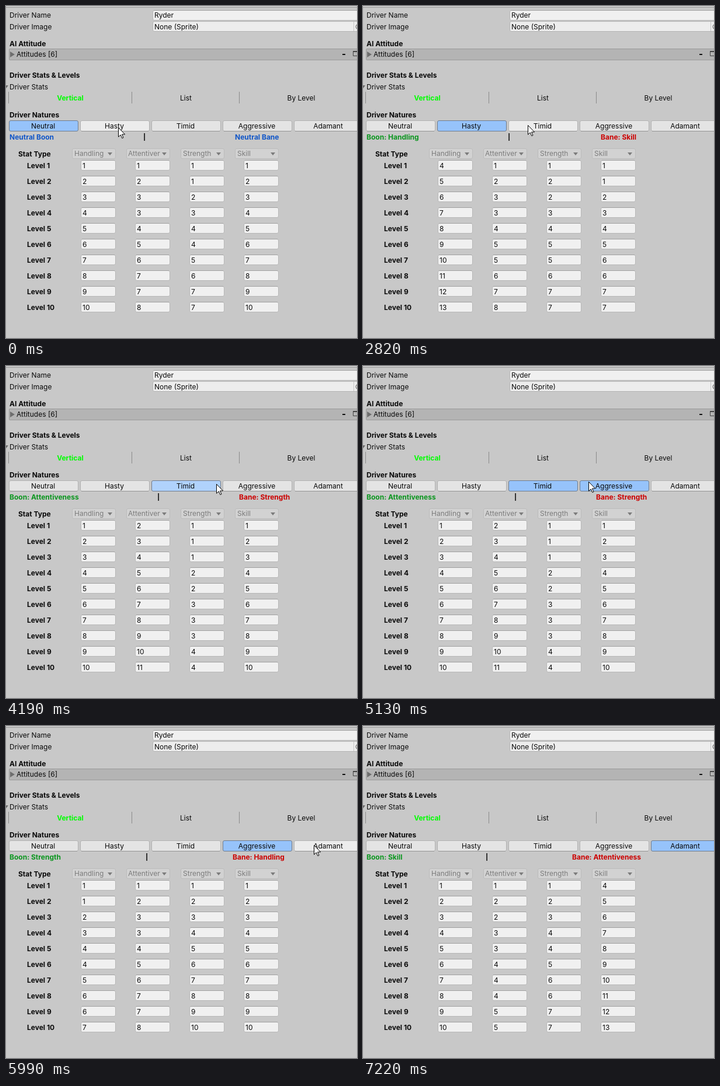
These frames come from a looping animation (601x569 px, 8.35 s). An HTML page:

```html
<!DOCTYPE html>
<html lang="en">
<head>
<meta charset="utf-8">
<title>Driver inspector</title>
<style>
  html, body { margin: 0; width: 100%; height: 100%; overflow: hidden; background: #c8c8c8; }
  svg { display: block; font: 12px Inter, sans-serif; }
  text { white-space: pre; }
</style>
</head>
<body>
<svg width="601" height="569" viewBox="0 0 601 569">
  <g id="panel"></g>
  <g id="live"></g>
  <path id="cursor" d="M.5 .5V16.3L4.2 12.9 6.8 18.6 9 17.6 6.5 12H11.6Z" fill="#fff" stroke="#000"/>
</svg>
<script>
const LOOP = 8350;
const NATURES = ['Neutral', 'Hasty', 'Timid', 'Aggressive', 'Adamant'];
const STATS = ['Handling', 'Attentiver', 'Strength', 'Skill'];
const GREEN = '#0a961e', RED = '#cc0000', BLUE = '#0f55c8';
const levels = [...Array(10).keys()];
const ramp = first => levels.map(i => first + i);
const COLUMN_X = [113, 206, 299, 392];

// One entry per selected nature; digit strings hold one value per level.
const STATES = [
  { press: 0, start: 0, boon: 'Neutral Boon', bane: 'Neutral Bane', bar: 237, baneX: 392,
    stats: [ramp(1), '1233456778', '1123445677', ramp(1)] },
  { press: 2210, start: 2340, boon: 'Boon: Handling', bane: 'Bane: Skill', bar: 250, baneX: 407,
    stats: [ramp(4), '1233455678', '1223455677', '1123456677'] },
  { press: 3710, start: 3830, boon: 'Boon: Attentiveness', bane: 'Bane: Strength', bar: 261, baneX: 399,
    stats: [ramp(1), ramp(2), '1112233344', ramp(1)] },
  { press: 5130, start: 5250, boon: 'Boon: Strength', bane: 'Bane: Handling', bar: 241, baneX: 388,
    stats: ['1123445667', '1233456778', ramp(1), ramp(1)] },
  { press: 6670, start: 6870, boon: 'Boon: Skill', bane: 'Bane: Attentiveness', bar: 212, baneX: 358,
    stats: [ramp(1), '1223344455', '1234456677', ramp(4)] }
];

// Pointer moves in discrete steps along quadratic curves.
const MOVES = [
  { start: 2520, step: 60, count: 6, to: [282, 204], bend: 206, power: 2 },
  { start: 4010, step: 60, count: 8, to: [386, 198], bend: 208, power: 2 },
  { start: 5450, step: 60, count: 10, to: [527, 204], bend: 216, power: 2 },
  { start: 6870, step: 70, count: 6, to: [612, 206], bend: 205, power: 1 }
];

const $ = id => document.getElementById(id);
const text = (x, y, s, { fill = '#090909', bold, center } = {}) =>
  `<text x="${x}" y="${y}" fill="${fill}"${bold ? ' font-weight="700"' : ''}` +
  `${center ? ' text-anchor="middle"' : ''}>${s}</text>`;
const rect = (x, y, w, h, fill) => `<rect x="${x}" y="${y}" width="${w}" height="${h}" fill="${fill}"/>`;
const box = (x, y, w, h, fill, stroke, r = 2.5) =>
  `<rect x="${x + .5}" y="${y + .5}" width="${w - 1}" height="${h - 1}" rx="${r}" fill="${fill}" stroke="${stroke}"/>`;
const shape = (d, fill, stroke = 'none') => `<path d="${d}" fill="${fill}" stroke="${stroke}"/>`;
const field = (x, y, w, h) =>
  box(x, y, w, h, '#f0f0f0', '#b7b7b7') + rect(x + 2, y, w - 4, 1, '#a0a0a0');

function drawPanel() {
  const bold = { bold: true }, center = { center: true };
  const parts = [
    rect(0, 2, 601, 1, '#999'),
    text(6, 20, 'Driver Name'), field(251, 7, 360, 18), text(254, 20, 'Ryder'),
    text(6, 40, 'Driver Image'), box(251, 26, 360, 18, '#ededed', '#b4b4b4'),
    rect(595, 27, 1, 16, '#c6c6c6'), text(254, 40, 'None (Sprite)'),
    '<circle cx="603" cy="35.5" r="4" fill="none" stroke="#555"/>',
    text(6, 69, 'AI Attitude', bold),
    box(5, 73, 606, 20, '#b4b4b4', '#999', 1), shape('M7 78L15 83 7 88Z', '#6e6e6e'),
    text(18, 87, 'Attitudes [6]'), rect(576, 82, 5, 2, '#111'),
    shape('M602 77.5H594.5V85.5H602', 'none', '#444'), rect(594, 77, 7, 2, '#444'),
    text(6, 123, 'Driver Stats &amp; Levels', bold),
    shape('M-5 136H4L-.5 142Z', '#6e6e6e'), text(6, 143, 'Driver Stats'),
    ...[4, 215, 399].map(x => rect(x, 147, 1, 20, '#8a8a8a')),
    text(110, 162, 'Vertical', { fill: '#00ff00', bold: true, center: true }),
    text(308, 162, 'List', center), text(505.5, 162, 'By Level', center),
    text(6, 191, 'Driver Natures', bold), text(21, 258, 'Stat Type', bold)
  ];
  STATS.forEach((name, c) => {
    const x = COLUMN_X[c];
    parts.push(box(x, 244, 75, 18, '#d2d2d2', '#bcbcbc'),
      text(x + 4 - (c === 1), 257, name, { fill: '#7c7c7c' }),
      shape(`M${x + 61} 251h8l-4 5Z`, '#7c7c7c'));
  });
  levels.forEach(i => {
    parts.push(text(36, 278 + 27 * i, 'Level ' + (i + 1), bold));
    COLUMN_X.forEach(x => parts.push(field(x + 15, 264 + 27 * i, 60, 18)));
  });
  $('panel').innerHTML = parts.join('');
}

function pointerAt(t) {
  let [x, y] = [192, 208];
  for (const { start, step, count, to, bend, power } of MOVES) {
    if (t < start) break;
    const p = Math.min(1, (Math.floor((t - start) / step) + 1) / count);
    const e = 1 - (1 - p) ** power;
    x += (to[0] - x) * e;
    y = y * (1 - e) ** 2 + 2 * bend * e * (1 - e) + to[1] * e * e;
  }
  return [Math.round(x), Math.round(y)];
}

function button(name, i, on, hover) {
  const x = 5 + 122 * i;
  const fill = on ? (hover ? '#b0d2fc' : '#96c3fb') : (hover ? '#ececec' : '#e4e4e4');
  return box(x, 196, 119, 19, fill, on ? '#707c8c' : '#b2b2b2') +
    (on ? '' : rect(x + 2, 214, 115, 1, '#939393')) +
    text(x + 58.5, 210, name, { center: true });
}

let shown = '';
function render(t) {
  const [px, py] = pointerAt(t);
  $('cursor').setAttribute('transform', `translate(${px} ${py})`);

  const current = STATES.findLastIndex(s => t >= s.start);
  const pressed = STATES.findLastIndex(s => t >= s.press);
  const { boon, bane, bar, baneX, stats } = STATES[current];
  const neutral = current === 0;
  const html = NATURES.map((name, i) => {
    const x = 5 + 122 * i;
    const inside = px < 601 && px >= x && px < x + 119;
    const down = pressed === i && pressed !== current;
    return button(name, i, i === current || down, inside && !down);
  }).join('') +
    text(6, 229, boon, { fill: neutral ? BLUE : GREEN, bold: true }) +
    rect(bar - .7, 218, 1.6, 13, '#111') +
    text(baneX, 229, bane, { fill: neutral ? BLUE : RED, bold: true }) +
    stats.map((column, c) =>
      levels.map(i => text(COLUMN_X[c] + 18, 278 + 27 * i, column[i])).join('')).join('');
  if (html !== shown) $('live').innerHTML = shown = html;
}

drawPanel();
const began = performance.now();
(function tick() {
  render((performance.now() - began) % LOOP);
  requestAnimationFrame(tick);
})();
</script>
</body>
</html>
```
